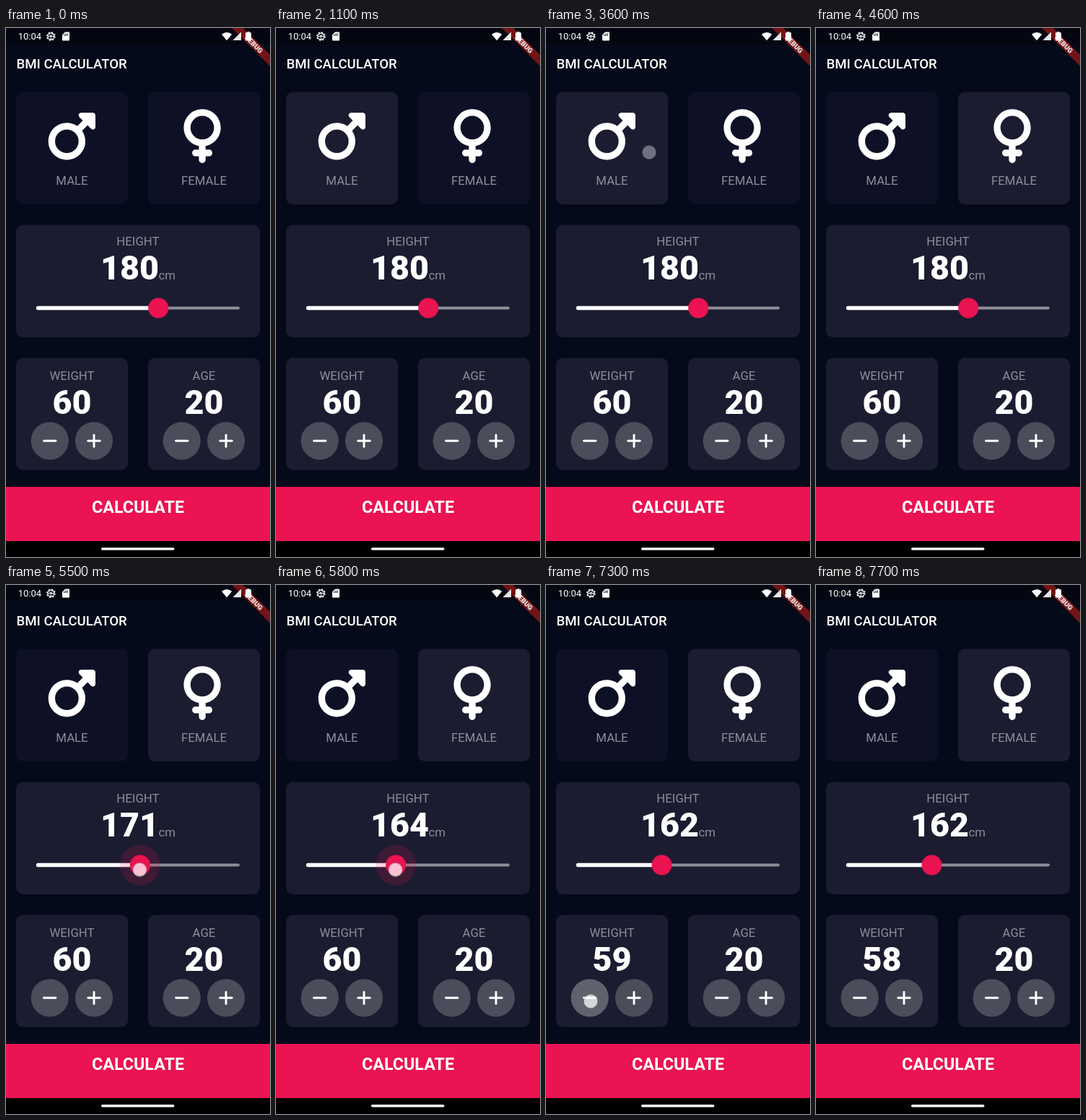
Animation of 366 by 732 pixels, one loop 8000 ms. Source, as an HTML page:

```html
<!DOCTYPE html>
<html lang="en">
<head>
<meta charset="utf-8">
<title>BMI Calculator</title>
<style>
html, body { margin: 0; width: 100%; height: 100%; overflow: hidden; background: #050a1a; }
svg { display: block; width: 366px; height: 732px; font-family: Roboto, sans-serif; }
.card { fill: #1b1c30; }
.label { font-size: 16.8px; fill: #8d8e98; }
.number { font-size: 46.6px; font-weight: 900; fill: #fff; }
.mid { text-anchor: middle; }
.icon { fill: #fff; }
.sign { stroke: #fff; stroke-width: 2.9; stroke-linecap: round; }
.dot { fill: #fff; fill-opacity: .75; stroke: #888; stroke-opacity: .35; }

.timed { animation: 8s step-end infinite; }
#male { animation-name: male; }
#female { animation-name: female; }
#maleTap { animation-name: maleTap; }
#femaleTap { animation-name: femaleTap; }
#minusTap { animation-name: minusTap; }
#halo { animation-name: halo; }
#dragDot { animation-name: dragDot; }

@keyframes male {
  0%, 32.5%, 55%, 100% { fill: #0e1025; }
  11.25%, 43.75% { fill: #1b1c30; }
}
@keyframes female {
  0%, 43.75% { fill: #0e1025; }
  32.5%, 55%, 100% { fill: #1b1c30; }
}
@keyframes maleTap {
  0%, 13.75%, 46.25%, 100% { opacity: 0; }
  10%, 42.5% { opacity: 1; }
  12.5%, 45% { opacity: .5; }
}
@keyframes femaleTap {
  0%, 35%, 57.5%, 100% { opacity: 0; }
  31.25%, 53.75% { opacity: 1; }
  33.75%, 56.25% { opacity: .5; }
}
@keyframes minusTap {
  0%, 92.5%, 96.25%, 100% { opacity: 0; }
  90%, 93.75% { opacity: 1; }
}
@keyframes halo {
  0% { opacity: 0; transform: scale(.5); }
  66.25% { opacity: 1; transform: scale(.5); }
  67.5% { opacity: 1; transform: scale(.85); }
  68.75% { opacity: 1; transform: scale(1); }
  78.75% { opacity: .65; transform: scale(1); }
  80% { opacity: .3; transform: scale(.8); }
  81.25%, 100% { opacity: 0; transform: scale(.5); }
}
@keyframes dragDot {
  0%, 78.75%, 100% { opacity: 0; }
  66.25% { opacity: 1; }
}
</style>
</head>
<body>
<svg viewBox="0 0 366 732">
  <defs>
    <filter id="soft" x="-20%" y="-80%" width="140%" height="260%"><feGaussianBlur stdDeviation="2.5"/></filter>
    <g id="minus">
      <circle r="26.1" fill="#4b4d5a"/>
      <path class="sign" d="M-8.2 0H8.2"/>
    </g>
    <g id="plus">
      <use href="#minus"/>
      <path class="sign" d="M0-8.2V8.2"/>
    </g>
  </defs>

  <rect width="366" height="732" fill="#050a1a"/>
  <rect width="366" height="22.5" fill="#040711"/>
  <text x="14.5" y="55.5" font-size="18.6" font-weight="500" fill="#fff">BMI CALCULATOR</text>

  <!-- gender -->
  <rect id="male" class="card timed" x="14" y="88.5" width="155" height="155.5" rx="9.3"/>
  <rect id="female" class="card timed" x="197" y="88.5" width="155" height="155.5" rx="9.3"/>
  <path class="icon" transform="translate(58.7 112.5) scale(.1457)" d="M289.8 46.8c3.7-9 12.5-14.8 22.2-14.8H424c13.3 0 24 10.7 24 24V168c0 9.7-5.8 18.5-14.8 22.2s-19.3 1.7-26.2-5.2l-33.4-33.4L321 204.2c19.5 28.4 31 62.7 31 99.8c0 97.2-78.8 176-176 176S0 401.2 0 304s78.8-176 176-176c37 0 71.4 11.4 99.8 31l52.6-52.6L295 73c-6.9-6.9-8.9-17.2-5.2-26.2zM176 416a112 112 0 1 0 0-224a112 112 0 1 0 0 224z"/>
  <path class="icon" transform="translate(244.1 112.3) scale(.1457)" d="M80 176a112 112 0 1 1 224 0A112 112 0 1 1 80 176zM224 349.1c81.9-15 144-86.8 144-173.1C368 78.8 289.2 0 192 0S16 78.8 16 176c0 86.3 62.1 158.1 144 173.1V384H128c-17.7 0-32 14.3-32 32s14.3 32 32 32h32v32c0 17.7 14.3 32 32 32s32-14.3 32-32V448h32c17.7 0 32-14.3 32-32s-14.3-32-32-32H224V349.1z"/>
  <text class="label mid" x="91.5" y="217">MALE</text>
  <text class="label mid" x="274.5" y="217">FEMALE</text>
  <circle id="maleTap" class="dot timed" cx="143" cy="172" r="9.5"/>
  <circle id="femaleTap" class="dot timed" cx="286" cy="178" r="9.5"/>

  <!-- height -->
  <rect class="card" x="14" y="272.5" width="338" height="155.5" rx="9.3"/>
  <text class="label mid" x="183" y="301">HEIGHT</text>
  <text id="height" class="number" x="131" y="348">180</text>
  <text class="label" x="211.5" y="348">cm</text>
  <path d="M44 387.5H322" stroke="#8d8e98" stroke-width="3.8" stroke-linecap="round"/>
  <path id="track" stroke="#fff" stroke-width="5.4" stroke-linecap="round" d="M44.5 387.5H211"/>
  <g id="thumb" transform="translate(211.2 387.5)">
    <circle id="halo" class="timed" r="28" fill="#eb1555" fill-opacity=".17"/>
    <circle r="14" fill="#eb1352"/>
    <circle id="dragDot" class="dot timed" cx="-.5" cy="6.5" r="9.5"/>
  </g>

  <!-- weight and age -->
  <rect class="card" x="14" y="456.5" width="155" height="155" rx="9.3"/>
  <rect class="card" x="197" y="456.5" width="155" height="155" rx="9.3"/>
  <text class="label mid" x="91.5" y="486.5">WEIGHT</text>
  <text class="label mid" x="274.5" y="486.5">AGE</text>
  <text id="weight" class="number mid" x="91.5" y="533.5">60</text>
  <text class="number mid" x="274.5" y="533.5">20</text>
  <use href="#minus" x="60.7" y="571.3"/>
  <use href="#plus" x="122" y="571.3"/>
  <use href="#minus" x="243.7" y="571.3"/>
  <use href="#plus" x="305" y="571.3"/>
  <g id="minusTap" class="timed">
    <circle cx="60.7" cy="571.3" r="26.1" fill="#fff" fill-opacity=".12"/>
    <circle class="dot" cx="62" cy="576" r="9.5"/>
  </g>

  <!-- bottom -->
  <rect y="635" width="366" height="75" fill="#eb1352"/>
  <text class="mid" x="183" y="671" font-size="23.3" font-weight="700" fill="#fff">CALCULATE</text>
  <rect y="710" width="366" height="22"/>
  <rect x="132" y="719" width="101.5" height="3.6" rx="1.8" fill="#fff"/>

  <!-- debug ribbon -->
  <g transform="translate(366) rotate(45)">
    <rect x="-54" y="26.1" width="108" height="11.2" opacity=".5" filter="url(#soft)"/>
    <rect x="-54" y="26.1" width="108" height="11.2" fill="#b71c1c" fill-opacity=".63"/>
    <text class="mid" y="35.1" font-size="9.5" font-weight="900" fill="#fff">DEBUG</text>
  </g>

  <!-- status bar -->
  <g fill="#fff">
    <text x="16.7" y="16.3" font-size="13">10:04</text>
    <g transform="translate(62.3 11.5)" fill="none" stroke="#fff">
      <circle r="4.5" stroke-width="1.3"/>
      <circle r="5.7" stroke-width="1.3" stroke-dasharray="2.2 2.277"/>
      <path d="M-4 0H4M0 0V4M-2-3L0 0L2-3" stroke-width="1"/>
    </g>
    <path d="M82 5.5H87Q88 5.5 88 6.5V16.5Q88 17.5 87 17.5H79Q78 17.5 78 16.5V9.5Z"/>
    <path d="M80.7 8.7V11M82.9 7.5V11M85.1 7.5V11" stroke="#040711"/>
    <path d="M299 8.7Q306 3.5 313.2 8.7L306.1 17.3Z"/>
    <path d="M326 5.5V17H314.5Z" fill-opacity=".35"/>
    <path d="M322 9.5V17H314.5ZM314.5 17L326 5.5V17Z" fill-opacity=".85"/>
    <path d="M334.5 5H337.5V6.3H339.3Q340 6.3 340 7V16.8Q340 17.5 339.3 17.5H332.7Q332 17.5 332 16.8V7Q332 6.3 332.7 6.3H334.5Z"/>
  </g>
</svg>
<script>
const LOOP = 8000, TICK = 100;
const el = id => document.getElementById(id);
const clamp = v => Math.min(1, Math.max(0, v));
let start;

function heightAt(t) {
  const p = clamp((t - 5300) / 800);
  return Math.round(180 - 18 * (1 - (1 - p) ** 2.4));
}

function weightAt(t) {
  return 60 - (t >= 7300) - (t >= 7600);
}

function draw(now) {
  start ??= now;
  const t = Math.floor(((now - start) % LOOP) / TICK) * TICK;
  const cm = heightAt(t);
  const x = 42 + (cm - 120) * 2.82;
  el('height').textContent = cm;
  el('weight').textContent = weightAt(t);
  el('thumb').setAttribute('transform', `translate(${x} 387.5)`);
  el('track').setAttribute('d', `M44.5 387.5H${x}`);
  requestAnimationFrame(draw);
}
requestAnimationFrame(draw);
</script>
</body>
</html>
```
